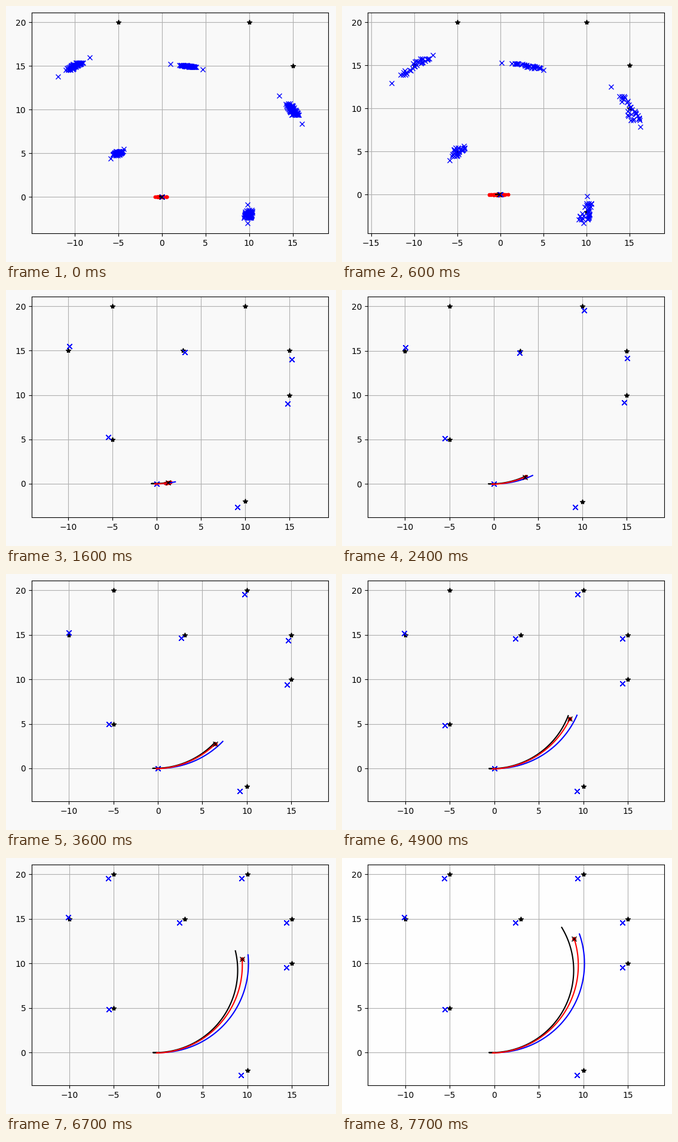
A matplotlib script for the animation above (8 s loop, 552x428 px).

```python
import numpy as np
import matplotlib.pyplot as plt
from matplotlib.animation import FuncAnimation

STEP = 100  # ms
LOOP = 8000
UPDATES = 19
PAUSES = {4: 200, 12: 100, 14: 200, 17: 100, 18: 100}  # on top of 400 ms
STARTS = 200 + np.cumsum([400 + PAUSES.get(k, 0) for k in range(UPDATES)]) - 800
STARTS = np.append(0, STARTS[1:] + 400)

MOVING = 3   # update at which the robot has started to drive
SETTLED = np.array([-0.62, -0.43])  # error the estimates drift towards

# x, y, first update seen, first error (x, y), how far it drifts
LANDMARKS = [
    (10, -2, 0, -0.87, -0.68, 0.5),
    (15, 10, 0, -0.20, -1.00, 1),
    (3, 15, 0, 0.17, -0.15, 1),
    (-5, 5, 0, -0.45, 0.23, 0.6),
    (-10, 15, 0, 0.15, 0.50, 0.35),
    (15, 15, 4, 0.28, -1.00, 1),
    (10, 20, 6, 0.54, -0.45, 1),
    (-5, 20, 14, -0.62, -0.43, 1),
]
ALL_SEEN = max(mark[2] for mark in LANDMARKS)


def turned(k):
    """Angle driven along the circle, in radians."""
    return np.interp(k, [MOVING, 12, 16, 18], [0.08, 1.158, 1.668, 1.908])


def arc(cx, cy, r, angle):
    return cx + r * np.sin(angle), cy - r * np.cos(angle)


def true_path(t):
    return arc(0.13, 10.0, 10.0, t)


def reckoned_path(t):
    return arc(-0.33, 9.25, 9.25, t + 0.03 * t ** 3)


def estimated_path(t):
    return arc(-0.41, 9.8, 9.85, np.maximum(t - 0.027, 0.02))


def with_start(points, *start_xs):
    x, y = points
    return (np.concatenate([start_xs, x]),
            np.concatenate([np.zeros(len(start_xs)), y]))


def scattered(k):
    """Landmark copies of every particle while the cloud is still wide."""
    n = 55 - 13 * k
    rng = np.random.default_rng(20 + k)
    psi = (0.029 + 0.0165 * k) * np.clip(rng.normal(size=n), -1.4, 1.6)
    dx = (0.3 + 0.05 * k) * np.clip(rng.normal(size=n), -1.6, 1.1)
    # the two most turned particles set the extent of the cloud
    psi = np.append(psi, [0.11 + 0.035 * k, -0.105 - 0.015 * k])
    dx = np.append(dx, [-0.34 + 0.13 * k, 0.11 - 0.03 * k])
    c, s = np.cos(psi), np.sin(psi)
    seen = [mark[:2] for mark in LANDMARKS if mark[2] <= k]
    x = [px * c - py * s + dx for px, py in seen]
    y = [px * s + py * c for px, py in seen]
    return np.ravel(x), np.ravel(y)


def converged(k):
    """One tight stack of copies per landmark, drifting to a shared error."""
    progress = np.clip((k - 4) / 7, 0, 1)
    spots = []
    for x, y, first, ex, ey, pull in LANDMARKS:
        if first <= k:
            error = np.array([ex, ey])
            spots.append((x, y) + error + (SETTLED - error) * progress * pull)
    return np.repeat(spots, 30, axis=0).T


def particles(k, here, heading):
    rng = np.random.default_rng(50 + k)
    if k <= MOVING:
        lo, hi = -0.8 - 0.25 * k, 0.6 + 0.15 * k
        x = np.clip(rng.normal((lo + hi) / 2, (hi - lo) / 4, 90), lo, hi)
        return x, rng.normal(0, 0.01 + 0.01 * k, 90)
    along = np.clip(rng.normal(0, 1, 30), -1.7, 1.7)
    along *= 0.18 * 0.6 ** (k - 4)
    return here[0] + along * np.cos(heading), here[1] + along * np.sin(heading)


def paths(k):
    if k < MOVING:
        return (([0], [0]), ([0, -0.25 - 0.15 * k], [0, 0]),
                ([0, -0.05 * (k + 1)], [0, 0]))
    t = np.linspace(0, turned(k), 120)
    return (with_start(true_path(t), 0),
            with_start(reckoned_path(t), 0, -0.57),
            with_start(estimated_path(t), 0))


def draw_update(k):
    truth, reckoned, estimate = paths(k)
    here = estimate[0][-1], estimate[1][-1]

    ax.plot(*np.array([mark[:2] for mark in LANDMARKS]).T, "*k")
    ax.plot(*particles(k, here, turned(k)), ".r")
    ax.plot(*(scattered(k) if k <= MOVING else converged(k)), "xb")
    if k < ALL_SEEN:  # landmarks not seen yet wait at the origin
        ax.plot(np.zeros(30), np.zeros(30), "xb")
    ax.plot(*truth, "-b")
    ax.plot(*reckoned, "-k")
    ax.plot(*estimate, "-r")
    ax.plot([here[0]], [here[1]], "xk")


def draw(frame):
    k = int(np.searchsorted(STARTS, frame * STEP, side="right")) - 1
    shade = "#fefefe" if k == UPDATES - 1 else "#f9f9f9"
    ax.clear()
    fig.set_facecolor(shade)
    ax.set_facecolor(shade)
    draw_update(k)
    ax.axis("equal")
    ax.grid(True)
    return []


# Update 0 opens the loop, update 1 follows after 200 ms.
gaps = [400 + PAUSES.get(k, 0) for k in range(2, UPDATES)]
STARTS = np.concatenate([[0, 200], 200 + np.cumsum(gaps)])

fig = plt.figure(figsize=(5.52, 4.28), dpi=100)
ax = fig.add_axes([43 / 552, 47.8 / 428, 496 / 552, 369.6 / 428])
anim = FuncAnimation(fig, draw, frames=LOOP // STEP, init_func=lambda: [],
                     interval=STEP, repeat=True, repeat_delay=0)
plt.show()
```
